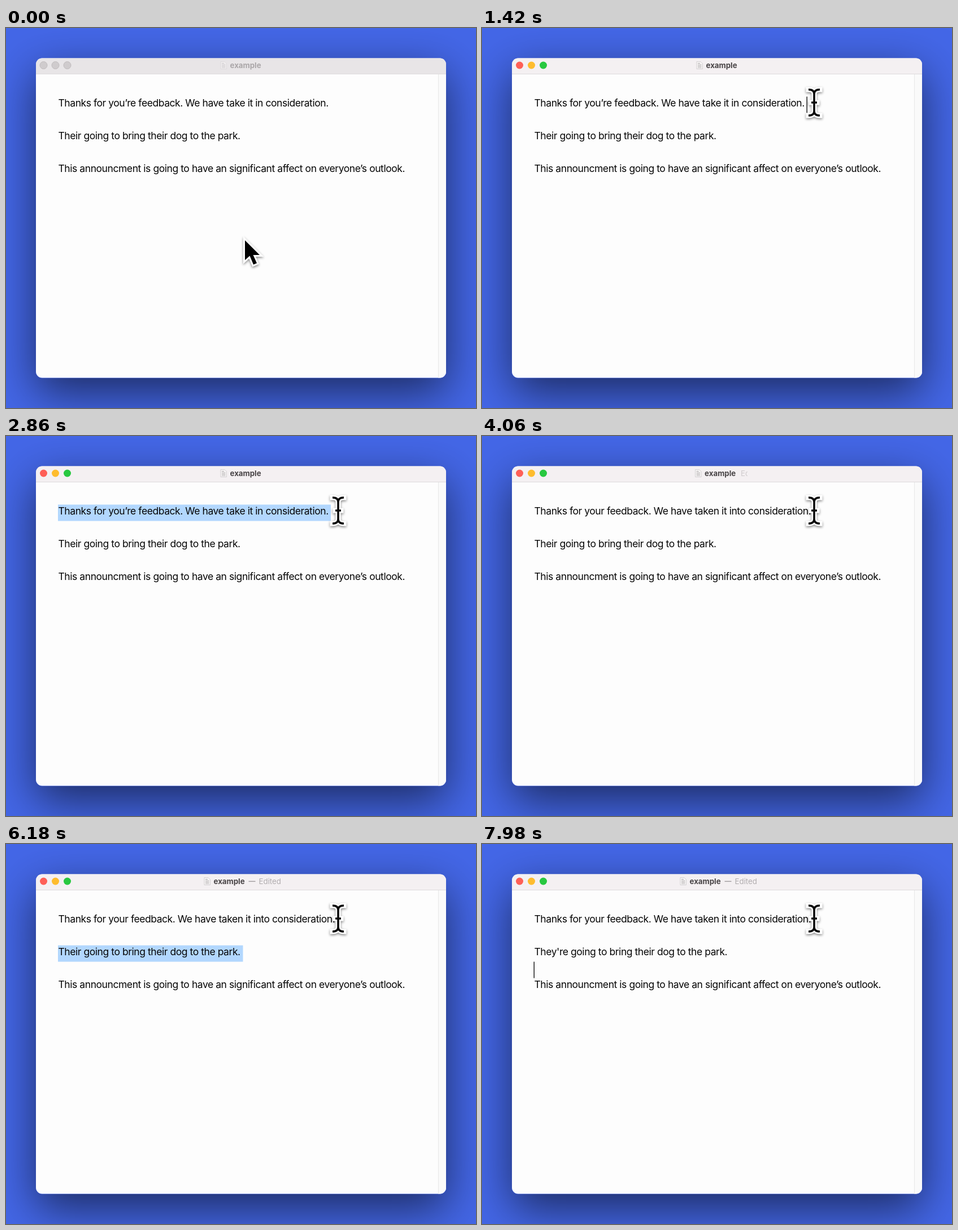
These frames come from a looping animation (832 px wide and 673 px high, 8000 ms). An HTML page:

```html
<!DOCTYPE html>
<html lang="en">
<head>
<meta charset="utf-8">
<style>
  html, body { margin: 0; width: 100%; height: 100%; overflow: hidden; background: #4467e7; }
  #window {
    position: absolute; left: 53px; top: 54px; width: 726px; height: 565.5px;
    border-radius: 11px; box-shadow: 0 26px 80px rgba(0, 0, 0, .58);
  }
  svg { position: absolute; left: 0; top: 0; }
  .line { font: 17.5px Inter, sans-serif; letter-spacing: -.025em; fill: #050505; }
  .title { font: 13.3px Inter, sans-serif; }
  .bold { font-weight: 700; }
  .cursor { filter: drop-shadow(0 2px 2px rgba(0, 0, 0, .45)); }
</style>
</head>
<body>
<div id="window"></div>
<svg width="832" height="673" viewBox="0 0 832 673">
  <defs>
    <clipPath id="frame"><rect x="53" y="53.500" width="726" height="566" rx="11"/></clipPath>
    <clipPath id="reveal"><rect id="revealBox" x="420" y="54" width="60" height="27"/></clipPath>
    <path id="beamShape" d="M-10-23Q0-23 0-15Q0-23 10-23M-10 23Q0 23 0 15Q0 23 10 23M0-16V16M-5 0H5"/>
  </defs>

  <g clip-path="url(#frame)">
    <rect x="53" y="53" width="726" height="567" fill="#fdfdfd"/>
    <rect id="bar" x="53" y="53" width="726" height="28"/>
    <rect x="53" y="81" width="726" height="1" fill="#dedadc"/>
    <rect x="765" y="82" width="14" height="538" fill="#fafafa"/>
    <rect x="765" y="82" width="1" height="538" fill="#e7e7e7"/>
  </g>
  <circle class="light" cx="66.500" cy="66" r="6.500"/>
  <circle class="light" cx="87.500" cy="66" r="6.500"/>
  <circle class="light" cx="108.500" cy="66" r="6.500"/>

  <g id="name">
    <g id="icon">
      <path d="M380 59.500H387L390.500 63V72.500H380Z" fill="#f8f6f6" stroke="#cbc7c9" stroke-width=".8"/>
      <path d="M382 62.500H386M382 65H388.500M382 67.500H388.500M382 70H388.500" stroke="#aaa6a8"/>
    </g>
    <text id="nameText" class="title bold" x="396.500" y="70.500">example</text>
  </g>
  <g id="edited" clip-path="url(#reveal)" fill="#b1adaf">
    <rect id="dash" x="429.500" y="65.500" width="12" height="1.500" fill="#a5a1a3"/>
    <text id="editedText" class="title" y="70.500">Edited</text>
  </g>

  <rect id="selection" x="92" height="29" fill="#b2d7fe"/>
  <text class="line" x="92.500" y="138.500"></text>
  <text class="line" x="92.500" y="196.500"></text>
  <text class="line" x="92.500" y="254.500">This announcment is going to have an significant affect on everyone’s outlook.</text>
  <rect id="caret" width="1.400" height="29" fill="#111"/>

  <path id="arrow" class="cursor" d="M0 0V35L8.500 27.500L15 43L21 40.500L14.500 26H26Z"
        stroke="#fff" stroke-width="6" paint-order="stroke"/>
  <g id="beam" class="cursor" transform="translate(588 132)" fill="none">
    <use href="#beamShape" stroke="#fff" stroke-width="9" stroke-linecap="square"/>
    <use href="#beamShape" stroke="#0a0a0a" stroke-width="3.600"/>
  </g>
</svg>

<script>
const LOOP = 8000, ACTIVATE = 1260, FIRST_FIX = 3980, SECOND_FIX = 7360;
const $ = id => document.getElementById(id);
const lines = document.querySelectorAll('.line');
const lights = document.querySelectorAll('.light');
const lightColors = ['#fe5f57', '#febc2e', '#28c840'];

// Insertion point or selection: its right edge and row top from a given time on
const edits = [
  { at: ACTIVATE, x: 575, y: 121.5 },
  { at: 1760, x: 575, y: 121.5, selected: true },
  { at: FIRST_FIX, x: 588, y: 121.5 },
  { at: 4680, x: 92, y: 150.5 },
  { at: 4920, x: 419, y: 179.5 },
  { at: 5720, x: 419.5, y: 179.5, selected: true },
  { at: SECOND_FIX, x: 439, y: 179.5 },
  { at: 7780, x: 92, y: 208.5 },
];

const set = (el, attrs) => {
  for (const key in attrs) el.setAttribute(key, attrs[key]);
};
const show = (el, on) => set(el, { visibility: on ? 'visible' : 'hidden' });
const mix = (a, b, p) => a + (b - a) * p;
const ease = (t, from, to) => {
  const p = Math.min(1, Math.max(0, (t - from) / (to - from)));
  return p * p * (3 - 2 * p);
};

function drawTitle(t, active) {
  set($('bar'), { fill: active ? '#f4f0f2' : '#e8e5e7' });
  lights.forEach((light, i) => set(light, {
    fill: active ? lightColors[i] : '#cfcbcd',
    stroke: active ? 'none' : '#bfbbbd',
  }));
  set($('icon'), { opacity: active ? 1 : .5 });
  set($('nameText'), { fill: active ? '#484446' : '#aaa6a8' });

  const slide = ease(t, 4015, 4275);
  set($('name'), { transform: `translate(${-29 * slide})` });
  set($('edited'), { opacity: mix(.5, 1, slide) });
  set($('editedText'), { x: mix(459, 447.5, slide) });
  set($('revealBox'), { width: mix(48, 72, slide) });
  show($('edited'), slide > 0);
}

function drawText(t) {
  lines[0].textContent = t < FIRST_FIX
    ? 'Thanks for you’re feedback. We have take it in consideration.'
    : 'Thanks for your feedback. We have taken it into consideration.';
  lines[1].textContent = t < SECOND_FIX
    ? 'Their going to bring their dog to the park.'
    : "They're going to bring their dog to the park.";

  const edit = edits.findLast(e => t >= e.at);
  show($('selection'), edit && edit.selected);
  show($('caret'), edit && !edit.selected && (t - edit.at) % 1060 < 560);
  if (!edit) return;
  set($('selection'), { y: edit.y, width: edit.x - 92 });
  set($('caret'), { x: edit.x - .5, y: edit.y });
}

function draw(t) {
  const active = t >= ACTIVATE;
  drawTitle(t, active);
  drawText(t);
  const x = mix(423, 588, ease(t, 400, 920));
  const y = mix(376, 135, ease(t, 400, 1150));
  set($('arrow'), { transform: `translate(${x} ${y})` });
  show($('arrow'), !active);
  show($('beam'), active);
}

const start = performance.now();
function tick() {
  draw((performance.now() - start) % LOOP);
  requestAnimationFrame(tick);
}
tick();
</script>
</body>
</html>
```
